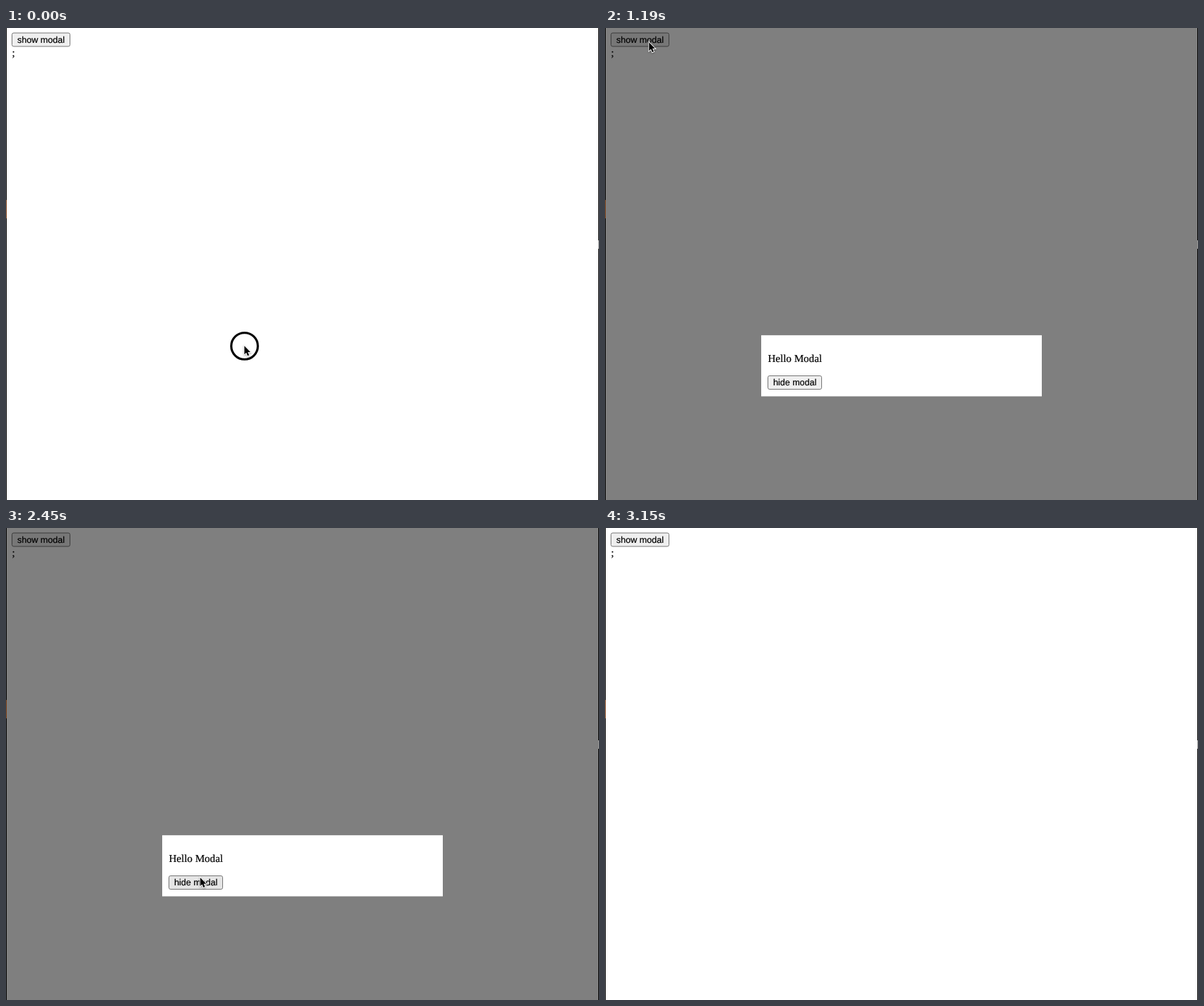
Animation of 839x667 px, one loop 3.71 s. Source, as an HTML page:

```html
<!DOCTYPE html>
<html lang="en">
<head>
<meta charset="utf-8">
<title>Modal demo</title>
<style>
  html, body { margin: 0; width: 100%; height: 100%; overflow: hidden; background: #fff; }
  svg { display: block; }
  text { stroke: #000; stroke-width: .2; text-rendering: geometricPrecision; }
  .label { font: 12.57px "Liberation Sans", Arial, sans-serif; }
  .prose { font: 15.09px "Liberation Serif", Times, serif; }
  .button { fill: #efefef; stroke: #767676; }
  .button.hover { fill: #e5e5e5; }
  .button.active { fill: #f5f5f5; stroke: #8d8d8d; }
  #arrow { stroke: #fff; stroke-width: 1.8; paint-order: stroke; filter: drop-shadow(0 1px 1px rgba(0, 0, 0, .35)); }
  #ring circle { fill: none; }
</style>
</head>
<body>
<svg width="839" height="667" viewBox="0 0 839 667">
  <rect width="839" height="667" fill="#fff"/>
  <rect id="show" class="button" x="8.5" y="7" width="82" height="19" rx="2.3"/>
  <text class="label" x="15.9" y="20.8">show modal</text>
  <text class="prose" x="8.5" y="39.6">;</text>

  <g id="modal">
    <rect width="839" height="667" fill="#000" opacity=".5"/>
    <rect x="221" y="434.2" width="397" height="86.3" fill="#fff"/>
    <text class="prose" x="230.4" y="472.3">Hello Modal</text>
    <rect id="hide" class="button" x="230.5" y="491.5" width="76" height="19" rx="2.3"/>
    <text class="label" x="237.9" y="505.4">hide modal</text>
  </g>

  <!-- window edges -->
  <rect width="1" height="667" fill="#000"/>
  <rect y="243" width="1" height="26" fill="#7a3c14"/>
  <rect x="838" width="1" height="667" fill="#000"/>
  <rect x="838" y="300" width="1" height="12" fill="#999"/>

  <g id="pointer">
    <g id="ring" transform="translate(.5 .5)">
      <circle r="19.2" stroke="#fff" stroke-width="4.6"/>
      <circle r="18.8" stroke="#000" stroke-width="3.1"/>
    </g>
    <path id="arrow" d="M.3 .3V12.3L3 9.8L4.9 14.2L7 13.3L5.1 9H8.8Z"/>
  </g>
</svg>
<script>
const TICK = 70, TICKS = 53;

const easeOut = k => 1 - (1 - k) ** 2;
const easeInOut = k => k < .5 ? 4 * k ** 3 : 1 - 4 * (1 - k) ** 3;

const rest = { x: 337, y: 449 };
const showSpot = { x: 62, y: 20 };
const corner = { x: 547, y: 600 };
const bend = { x: 358, y: 230 };
const greeting = { x: 267, y: 463 };
const hideSpot = { x: 277, y: 504 };
const exit = { x: 350, y: 641 };

// Each leg is a straight line, or a quadratic curve when it has a "via" point.
const legs = [
  { start: 2, end: 12, from: rest, to: showSpot, ease: easeInOut },
  { start: 19, end: 25, from: showSpot, to: corner, ease: easeInOut },
  { start: 25, end: 31, from: corner, via: bend, to: greeting, ease: easeOut },
  { start: 31, end: 39, from: greeting, to: hideSpot, ease: easeOut },
  { start: 43, end: 44, from: hideSpot, to: exit, ease: easeOut }
];

const byId = id => document.getElementById(id);
const [show, hide, modal, pointer, ring] = ["show", "hide", "modal", "pointer", "ring"].map(byId);
const within = (value, from, to) => value >= from && value < to;
const setVisible = (node, on) => node.setAttribute("visibility", on ? "visible" : "hidden");
const mix = (a, b, k) => ({ x: a.x + (b.x - a.x) * k, y: a.y + (b.y - a.y) * k });

function position(tick) {
  const { start, end, from, via, to, ease } = legs.findLast(leg => tick >= leg.start) || legs[0];
  const k = ease(Math.min(1, Math.max(0, (tick - start) / (end - start))));
  return via ? mix(mix(from, via, k), mix(via, to, k), k) : mix(from, to, k);
}

function setState(button, hover, active) {
  button.setAttribute("class", "button" + (active ? " active" : hover ? " hover" : ""));
}

function draw() {
  const tick = Math.floor(performance.now() / TICK + 1e-6) % TICKS;
  const { x, y } = position(tick);
  const open = within(tick, 17, 40);
  const pressShow = within(tick, 15, 17), pressHide = within(tick, 39, 40);
  const present = tick < 45;

  setVisible(modal, open);
  setVisible(pointer, present);
  setVisible(ring, present && (tick < 3 || pressShow || pressHide));
  pointer.setAttribute("transform", `translate(${x} ${y})`);
  setState(show, !open && x < 91 && y < 26, pressShow);
  setState(hide, within(x, 231, 307) && within(y, 491, 511), pressHide);
}

function loop() {
  draw();
  requestAnimationFrame(loop);
}
loop();
</script>
</body>
</html>
```
